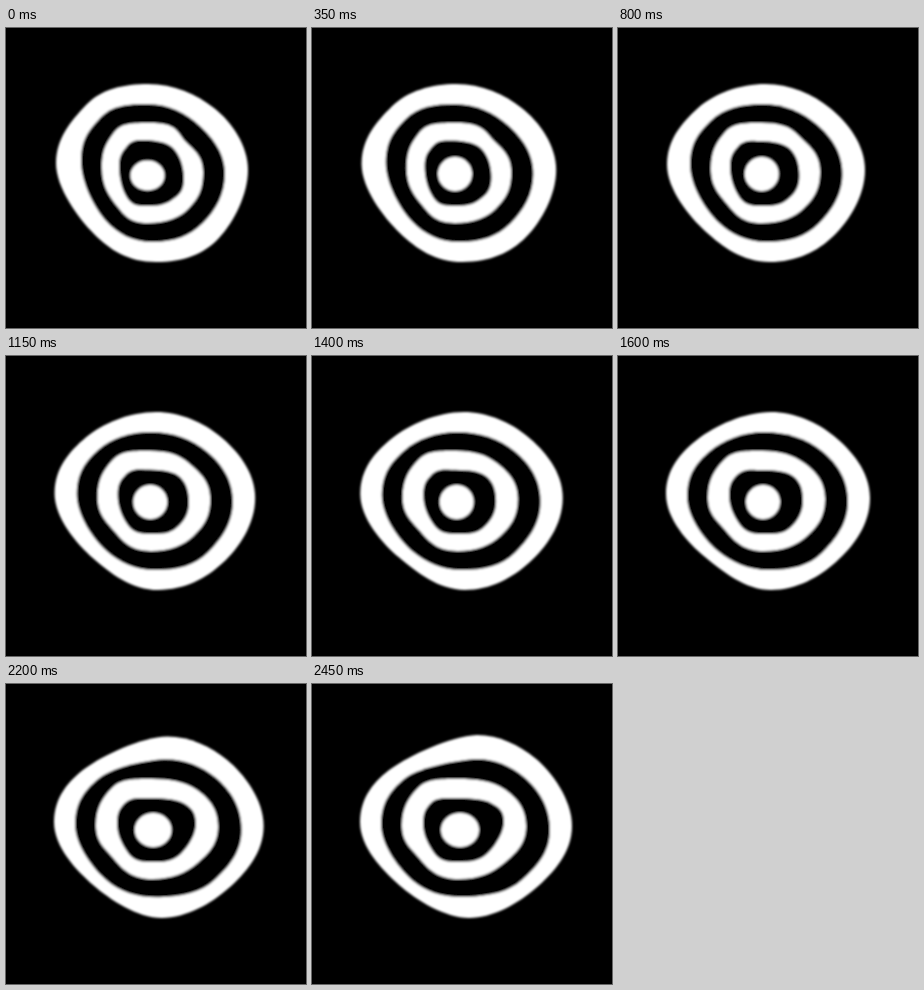
An HTML page without scripts that plays this animation: 300x300 px, repeating every 2500 ms.

```html
<!DOCTYPE html>
<html lang="en">
<head>
<meta charset="utf-8">
<title>Wobbling rings</title>
<style>
  html, body { margin: 0; width: 100%; height: 100%; overflow: hidden; background: #000; }
  svg { display: block; width: 100vw; height: 100vh; }
  .light { fill: #fff; }
  .dark { fill: #000; }

  /* Each contour drifts through three poses, then snaps back to the first. */
  path, ellipse { animation: 2.5s linear infinite; }
  .outer { animation-name: outer; }
  .gap { animation-name: gap; }
  .inner { animation-name: inner; }
  .hollow { animation-name: hollow; }
  .dot { animation-name: dot; }

  @keyframes outer {
    0% { d: path("M142 56C168 56 190 66 208 80S242 118 242 142 228 194 213 210 178 234 150 234 104 222 88 206 50 160 50 135 65 93 80 77 118 56 142 56Z"); }
    64% { d: path("M153 56C176 56 199 66 216 80S252 115 252 142 235 191 218 206 179 234 153 234 104 215 87 201 48 163 48 138 63 96 80 83 126 56 153 56Z"); }
    98%, 100% { d: path("M165 51C187 51 207 61 223 74S260 115 260 142 241 189 224 204 181 234 157 234 104 216 87 201 48 163 48 138 63 96 80 84 138 52 165 51Z"); }
  }
  @keyframes gap {
    0% { d: path("M142 76C162 76 180 85 194 98S219 126 219 146 210 182 197 195 168 214 147 214 112 206 100 193 75 154 75 133 82 103 94 90 122 76 142 76Z"); }
    64% { d: path("M146 76C168 76 188 82 204 95S230 124 230 146 217 184 204 197 173 214 151 214 114 206 101 196 69 162 69 140 79 106 92 95 125 76 146 76Z"); }
    98%, 100% { d: path("M162 75C180 74 198 81 212 93S238 122 238 146 223 184 210 196 178 212 155 213 114 208 101 197 69 162 69 140 79 106 92 95 140 77 162 75Z"); }
  }
  @keyframes inner {
    0% { d: path("M142 95C160 95 168 97 175 108S197 124 197 144 191 171 183 180 160 195 142 195 119 188 111 178 96 158 96 140 100 116 107 106 122 95 142 95Z"); }
    64% { d: path("M144 95C162 95 175 99 186 107S207 125 207 143 199 171 189 180 165 195 146 195 118 187 108 175 90 158 90 141 97 113 106 104 124 95 144 95Z"); }
    98%, 100% { d: path("M146 95C164 95 180 97 192 105S214 124 214 142 204 169 192 179 167 195 147 195 118 187 108 175 90 158 90 141 97 113 106 104 126 95 146 95Z"); }
  }
  @keyframes hollow {
    0% { d: path("M139 112C148 112 160 114 166 119S178 136 178 150 173 167 166 172 152 178 141 178 125 177 120 168 113 148 113 138 116 124 121 118 131 112 139 112Z"); }
    64% { d: path("M139 114C151 114 167 114 175 120S185 134 185 145 180 165 172 172 155 178 143 178 125 174 120 166 111 150 111 139 114 124 119 119 130 113 139 114Z"); }
    98%, 100% { d: path("M139 114C153 114 169 114 179 119S192 129 192 138 185 160 176 169 156 178 143 178 125 174 120 166 111 150 111 139 114 124 119 119 130 114 139 114Z"); }
  }
  @keyframes dot {
    0% { cx: 141.5px; cy: 147.5px; rx: 17px; ry: 15px; }
    14% { cx: 143px; cy: 146px; rx: 17px; ry: 17px; }
    64% { cx: 145px; cy: 146px; rx: 17px; ry: 17px; }
    98%, 100% { cx: 148px; cy: 146px; rx: 19px; ry: 17px; }
  }
</style>
</head>
<body>
<svg viewBox="0 0 300 300">
  <filter id="soften"><feGaussianBlur stdDeviation=".8"/></filter>
  <g filter="url(#soften)">
    <path class="light outer"/>
    <path class="dark gap"/>
    <path class="light inner"/>
    <path class="dark hollow"/>
    <ellipse class="light dot"/>
  </g>
</svg>
</body>
</html>
```
